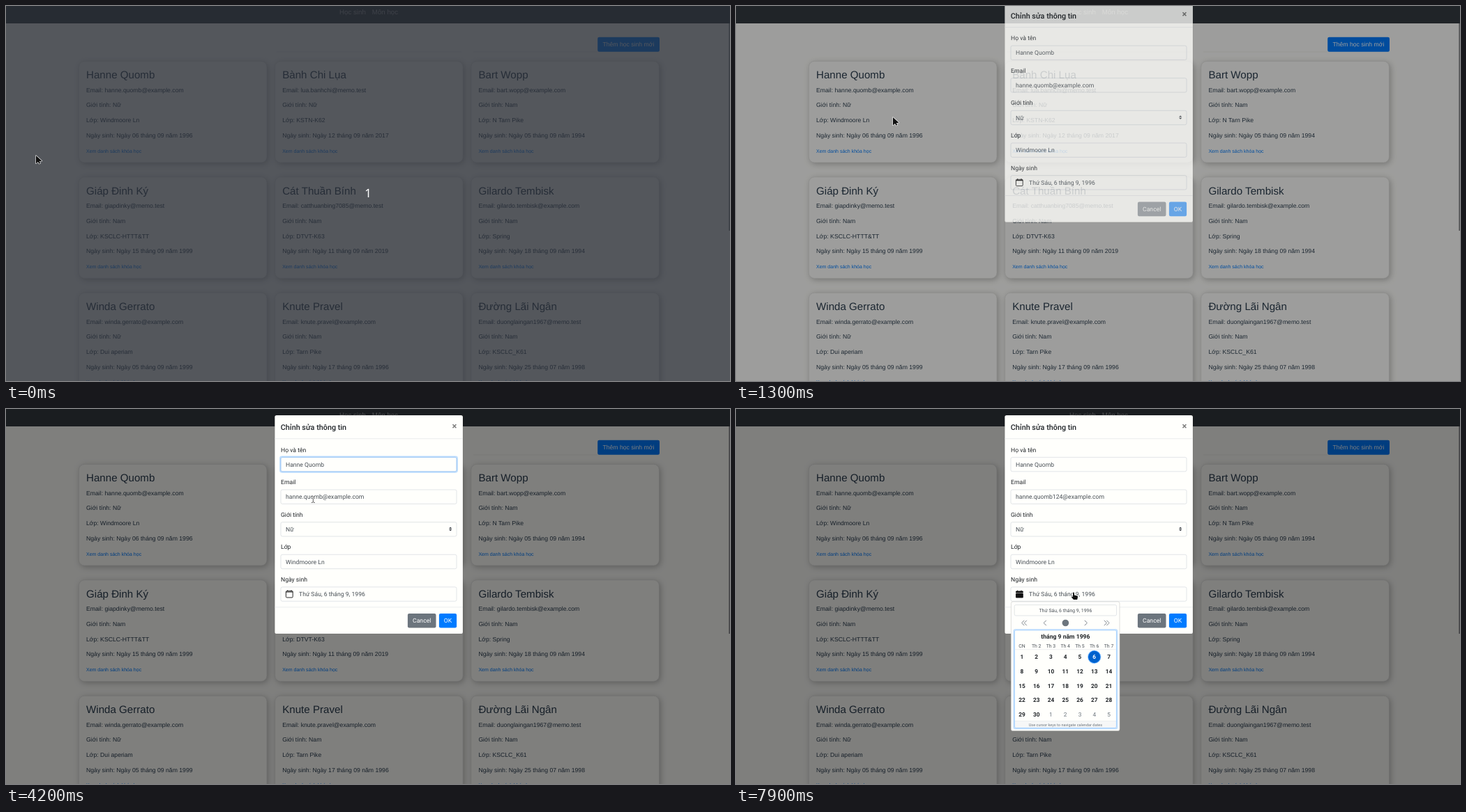
An HTML page for the animation above (8000 ms loop, 1038x539 px).

```html
<!DOCTYPE html>
<html lang="vi">
<head>
<meta charset="utf-8">
<title>Học sinh</title>
<style>
html, body { margin: 0; width: 100%; height: 100%; overflow: hidden; background: #fffffc; }
svg { display: block; width: 1038px; height: 539px; }
text { text-rendering: geometricPrecision; white-space: pre; }
.page { font-family: "Liberation Sans", Arial, sans-serif; }
.modal { font-family: Roboto, sans-serif; }
.card { fill: #fffffc; stroke: #dcdcda; stroke-width: .6; filter: drop-shadow(2.2px 2.2px 4.2px rgba(0,0,0,.25)); }
.mid { text-anchor: middle; }
.bold { font-weight: 700; }
.medium { font-weight: 500; }
</style>
</head>
<body>
<svg id="stage" viewBox="0 0 1038 539"></svg>
<script>
const INK = '#212529', NAVY = '#2c3e50', FIELD = '#495057', GREY = '#6c757d', BLUE = '#007bff', PAPER = '#fffffc';
const LOOP = 8000, STEP = 100, BLINK = 601;

const text = (x, y, s, size = 8.65, fill = INK, cls = '', id = '') =>
  `<text x="${x}" y="${y}" font-size="${size}" fill="${fill}" class="${cls}" id="${id}">${s}</text>`;
const rect = (x, y, w, h, fill, r = 0, more = '') =>
  `<rect x="${x}" y="${y}" width="${w}" height="${h}" rx="${r}" fill="${fill}" ${more}/>`;
const path = (d, more) => `<path d="${d}" ${more}/>`;
const border = (color, width = .6) => `stroke="${color}" stroke-width="${width}"`;

// name, email, gender, class, birthday
const students = [
  ['Hanne Quomb', 'hanne.quomb@example.com', 'Nữ', 'Windmoore Ln', '06 tháng 09 năm 1996'],
  ['Bành Chi Lụa', 'lua.banhchi@memo.test', 'Nữ', 'KSTN-K62', '12 tháng 09 năm 2017'],
  ['Bart Wopp', 'bart.wopp@example.com', 'Nam', 'N Tarn Pike', '05 tháng 09 năm 1994'],
  ['Giáp Đinh Ký', 'giapdinky@memo.test', 'Nam', 'KSCLC-HTTT&amp;TT', '15 tháng 09 năm 1999'],
  ['Cát Thuần Bính', 'catthuanbing7085@memo.test', 'Nam', 'DTVT-K63', '11 tháng 09 năm 2019'],
  ['Gilardo Tembisk', 'gilardo.tembisk@example.com', 'Nam', 'Spring', '18 tháng 09 năm 1994'],
  ['Winda Gerrato', 'winda.gerrato@example.com', 'Nữ', 'Dui aperiam', '05 tháng 09 năm 1999'],
  ['Knute Pravel', 'knute.pravel@example.com', 'Nam', 'Tarn Pike', '17 tháng 09 năm 1996'],
  ['Đường Lãi Ngân', 'duonglaingan1967@memo.test', 'Nam', 'KSCLC_K61', '25 tháng 07 năm 1998'],
];

function card([name, email, gender, group, born], i) {
  const x = 104.4 + i % 3 * 281.2, y = 79.4 + Math.floor(i / 3) * 166.4;
  const lines = ['Email: ' + email, 'Giới tính: ' + gender, 'Lớp: ' + group, 'Ngày sinh: Ngày ' + born];
  return `<rect class="card" x="${x}" y="${y}" width="269.6" height="145.6" rx="8"/>`
    + text(x + 10.6, y + 25, name, 15.14, NAVY)
    + lines.map((s, k) => text(x + 10.6, y + 44.4 + k * 21.65, s, 8.67, NAVY)).join('')
    + text(x + 10.6, y + 131.2, 'Xem danh sách khóa học', 7.03, BLUE);
}

const page = `<g class="page">
  ${rect(0, 0, 1038, 539, PAPER)}
  ${rect(0, 0, 1038, 25, '#343a40')}
  ${text(478, 12, 'Học sinh', 9.73, '#9a9da0')}${text(524.8, 12, 'Môn học', 9.73, '#9a9da0')}
  ${rect(388, 65.5, 265, 1, '#f3f3f0')}${rect(670, 65.5, 178, 1, '#f3f3f0')}
  ${rect(848.2, 44.8, 88.8, 21, BLUE, 2.2)}${text(855.4, 58.3, 'Thêm học sinh mới', 8.67, '#fff')}
  ${students.map(card).join('')}
  ${rect(1036.4, 25, 1.6, 298, '#85878a')}</g>`;

const fieldTop = k => 69.4 + k * 46.62;
const field = (k, label, value, id = '', x = 401) =>
  text(394, fieldTop(k) - 7.8, label)
  + `<g id="${id}box">${rect(394, fieldTop(k), 252, 20.4, PAPER, 2.2, border('#ced4da'))}</g>`
  + text(x, fieldTop(k) + 13.4, value, 8.65, FIELD, '', id);

const modal = `<g class="modal" id="modal">
  ${rect(385.3, 8.9, 269.7, 314.2, PAPER, 2.6, border('rgba(0,0,0,.2)', .5))}
  ${text(393.8, 29.9, 'Chỉnh sửa thông tin', 10.81, INK, 'medium')}
  ${text(643, 28.6, '×', 13, '#7f7f7e', 'mid bold')}
  ${rect(385.3, 42.5, 269.7, .6, '#dee2e6')}
  ${field(0, 'Họ và tên', students[0][0], 'name')}
  ${field(1, 'Email', students[0][1], 'email')}
  ${field(2, 'Giới tính', 'Nữ')}
  ${path('M2 0L0 2h4zm0 5L0 3h4z', 'transform="translate(635 169.8) scale(1.08)" fill="#343a40"')}
  ${field(3, 'Lớp', students[0][3])}
  ${field(4, 'Ngày sinh', 'Thứ Sáu, 6 tháng 9, 1996', '', 420)}
  <g id="iconLine">${rect(401.4, 261.6, 9.8, 9.4, 'none', 1.2, border('#111', .9))}
    ${path('M401.4 263h9.8M403.6 260.6v1.4M409 260.6v1.4', border('#111', 1.2))}</g>
  <g id="iconFull">${rect(401, 264.6, 10.8, 6.9, '#111', 1.2)}
    ${path('M401 264v-1.2q0-1.2 1.2-1.2h8.4q1.2 0 1.2 1.2V264z', 'fill="#111"')}
    ${path('M403.6 260.6v1.4M409 260.6v1.4', border('#111', .9))}</g>
  ${rect(385.3, 284.6, 269.7, .6, '#dee2e6')}
  <g id="buttons">
    ${rect(575.9, 293.9, 40.6, 20.6, GREY, 2.2)}${text(596.2, 307.2, 'Cancel', 8.65, '#fff', 'mid')}
    ${rect(620.9, 293.9, 25.2, 20.6, BLUE, 2.2)}${text(633.5, 307.2, 'OK', 8.65, '#fff', 'mid')}
  </g>
  ${rect(0, 0, .7, 10, INK, 0, 'id="caret"')}
</g>`;

const glow = (x, y, w, h, r) => rect(x - 1, y - 1, w + 2, h + 2, 'none', r, border('rgba(0,123,255,.25)', 1.73))
  + rect(x, y, w, h, 'none', r, border('#80bdff'));
const focusRing = (k, id) => `<g id="${id}">${glow(394, fieldTop(k), 252, 20.4, 2.2)}</g>`;

const columnX = c => 409.9 + c * 20.77;
function day(_, i) {
  const x = columnX(i % 7), y = 359.4 + Math.floor(i / 7) * 20.6, n = i % 30 + 1;
  const disc = i === 5
    ? `<circle cx="${x}" cy="${y - 3}" r="8.8" fill="#0062cc" ${border('rgba(0,123,255,.4)', 1.7)}/>` : '';
  return disc + text(x, y, n, 8.3, i > 29 ? GREY : i === 5 ? '#fff' : INK, i > 29 ? 'mid' : 'mid bold');
}
const chevron = (x, d) => path(`M${x - d * 1.8} 303.8l${d * 3.6} 3.7l${-d * 3.6} 3.7`, 'fill="none" ' + border(GREY, .9));

const calendar = `<g class="modal" id="calendar">
  ${rect(394.4, 276.9, 155.6, 185.6, PAPER, 2.6, border('#c8c8c6'))}
  ${rect(399.2, 281.6, 146.4, 15.4, PAPER, 2, border('#ced4da'))}
  ${text(472.4, 291.9, 'Thứ Sáu, 6 tháng 9, 1996', 6.9, FIELD, 'mid')}
  ${chevron(411.5, -1)}${chevron(415, -1)}${chevron(443, -1)}
  <circle cx="472.4" cy="307.5" r="4.8" fill="${GREY}"/>
  ${chevron(501.6, 1)}${chevron(529.7, 1)}${chevron(533.2, 1)}
  ${rect(399.6, 448.6, 145.6, 9.6, '#f6f7f7')}${rect(399.6, 448.4, 145.6, .5, '#dee2e6')}
  ${glow(399.4, 318, 146, 140.4, 2)}
  ${text(472.4, 329.7, 'tháng 9 năm 1996', 8.65, INK, 'mid bold')}
  ${['CN', 2, 3, 4, 5, 6, 7].map((d, c) => text(columnX(c), 343, c ? 'Th ' + d : d, 6.92, FIELD, 'mid')).join('')}
  ${rect(399.6, 345.6, 145.6, .5, '#dee2e6')}
  ${Array.from({length: 35}, day).join('')}
  ${text(472.4, 455.5, 'Use cursor keys to navigate calendar dates', 5.54, GREY, 'mid')}
</g>`;

const outline = 'stroke="#fff" stroke-width="1.2" stroke-linejoin="round" paint-order="stroke" fill="#111"';
const beam = 'M-2.5 -4.5Q0 -4.5 0 -3.5Q0 -4.5 2.5 -4.5M0 -3.5V3.5M-2.5 4.5Q0 4.5 0 3.5Q0 4.5 2.5 4.5';
const pointer = `<g id="pointer">
  ${path('M0 0V11.4L3 9L4.4 11.8L6.2 11L4.9 8.2L8.6 7.7Z', outline + ' id="arrow"')}
  <g id="beam" fill="none">${path(beam, border('#fff', 1.8))}${path(beam, border('#333', .8))}</g>
  ${path('M-1 1a1 1 0 0 1 2 0V4L5 5Q6.3 5.4 6 7L5.2 10.6H0L-2.8 7.4Q-3.2 6 -1.8 6L-1 6.8Z', outline + ' id="hand"')}
</g>`;

const countdown = `<g id="countdown">${rect(0, 0, 1038, 539, 'rgba(37,40,48,.78)')}
  <text x="519" y="275" font-size="17" fill="#fff" class="mid" font-family="Noto Sans, sans-serif">1</text></g>`;

const stage = document.getElementById('stage');
stage.innerHTML = page + rect(0, 0, 1038, 539, '#000', 0, 'id="veil"') + modal + calendar + countdown + pointer;
const $ = id => document.getElementById(id);
$('namebox').innerHTML += focusRing(0, 'nameRing');
$('emailbox').innerHTML += focusRing(1, 'emailRing');

// pointer path: time, x, y
const track = [
  [200, 43, 215], [600, 190, 172], [700, 190, 172], [1000, 225, 160], [1700, 225, 160],
  [1900, 475, 91], [2100, 475, 91], [2300, 475, 81], [2700, 475, 81], [3100, 486, 109],
  [3400, 486, 109], [4100, 432, 129], [4400, 457, 132], [4700, 457, 132], [4900, 491.5, 136],
  [5600, 491.5, 136], [5900, 544, 259], [6000, 544, 259], [6300, 612, 284], [6900, 502, 219],
  [7100, 502, 219], [7500, 484, 263.5], [LOOP, 484, 263.5],
];
const caretResets = [2300, 4400, 4800, 5100, 5800, 7000];

const ramp = (t, start, length) => Math.min(1, Math.max(0, (t - start) / length));
const show = (id, on) => $(id).setAttribute('display', on ? 'inline' : 'none');
const fade = (id, value) => $(id).setAttribute('opacity', value);
const typed = t => '124'.slice(0, [4800, 5100, 5800].filter(k => k <= t).length);

function pointerAt(t) {
  const i = Math.max(1, track.findIndex(k => k[0] > t));
  const [t0, x0, y0] = track[i - 1], [t1, x1, y1] = track[i];
  const p = ramp(t, t0, t1 - t0);
  return [x0 + (x1 - x0) * p, y0 + (y1 - y0) * p];
}

function drawCaret(t) {
  const last = caretResets.filter(r => r <= t).pop();
  show('caret', last && t < 7700 && Math.floor((t - last) / BLINK) % 2 === 0);
  const inEmail = t >= 4400;
  const count = 11 + typed(t).length;
  $('caret').setAttribute('x', 401 + $(inEmail ? 'email' : 'name').getSubStringLength(0, count));
  $('caret').setAttribute('y', fieldTop(inEmail ? 1 : 0) + 5.3);
}

function draw(t) {
  show('countdown', t < 200);

  const shown = ramp(t, 1185, 150);
  fade('veil', shown / 2);
  fade('modal', shown);
  fade('buttons', shown < 1 ? .65 : 1); // disabled while opening
  const drop = -27 * (1 - ramp(t, 1185, 300)) ** 1.62;
  $('modal').setAttribute('transform', `translate(0 ${drop})`);

  fade('nameRing', ramp(t, 2250, 150) - ramp(t, 4350, 150));
  fade('emailRing', ramp(t, 4350, 150) - ramp(t, 7650, 150));
  $('email').textContent = students[0][1].replace('@', typed(t) + '@');
  drawCaret(t);
  show('calendar', t >= 7800);

  const [x, y] = pointerAt(t);
  const over = k => t >= 1500 && x > 394 && x < 646 && y > fieldTop(k) && y < fieldTop(k) + 20.4;
  const onDate = over(4), onText = [0, 1, 3].some(over);
  show('hand', onDate);
  show('beam', onText);
  show('arrow', !onDate && !onText);
  show('iconFull', onDate);
  show('iconLine', !onDate);
  $('pointer').setAttribute('transform', `translate(${x} ${y})`);
}

function tick() {
  const t = performance.now() % LOOP;
  draw(t - t % STEP);
  requestAnimationFrame(tick);
}
tick();
</script>
</body>
</html>
```
